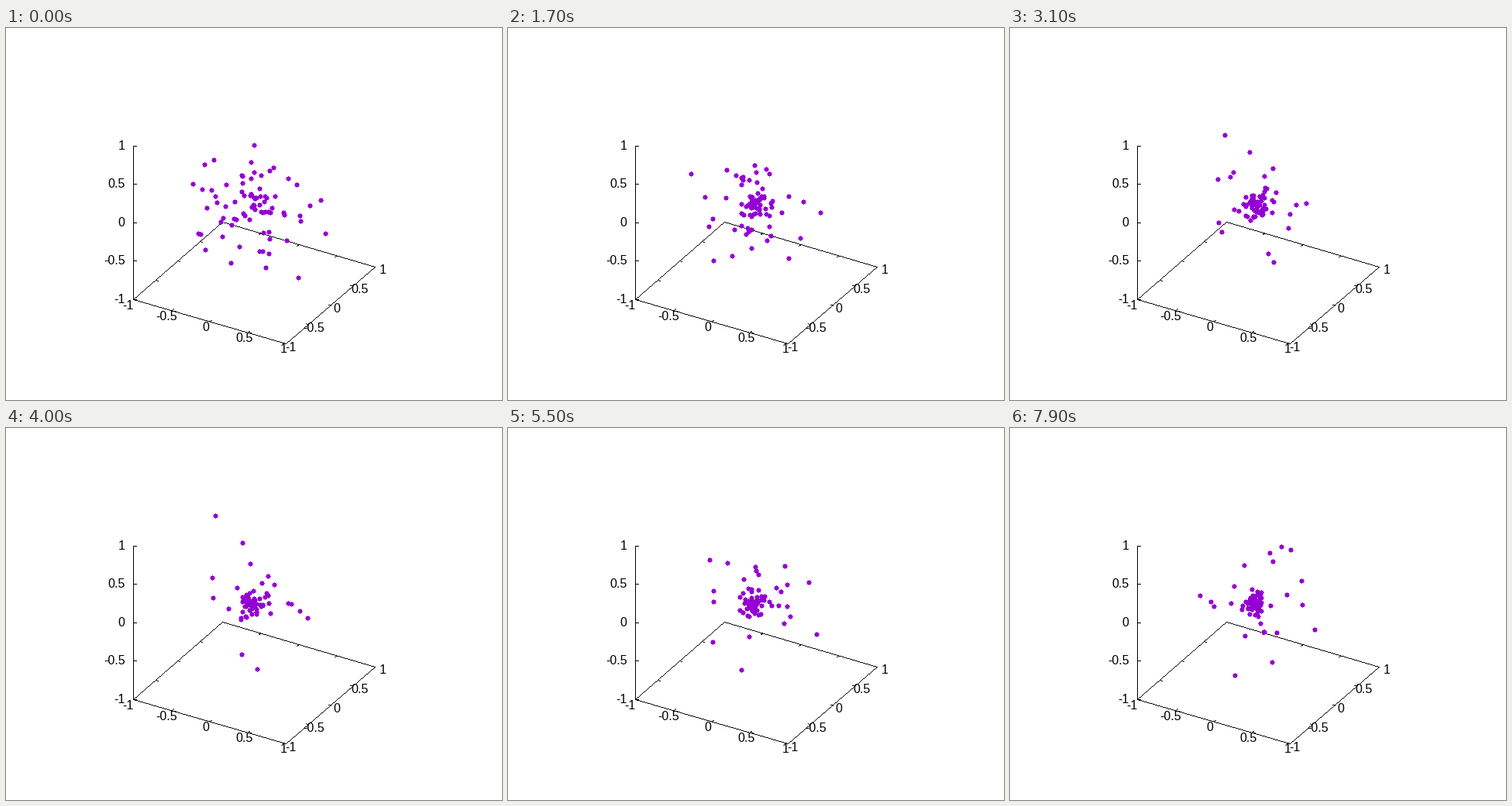
Write a matplotlib script that moves like this. It is 640x480 px and loops after 8 s.

```python
import numpy as np
import matplotlib.pyplot as plt
from matplotlib.animation import FuncAnimation
from matplotlib.collections import PolyCollection

W, H, DPI = 640, 480, 100
FRAMES, STEP = 80, 100

fig = plt.figure(figsize=(W / DPI, H / DPI), dpi=DPI, facecolor="white")
ax = fig.add_axes([0, 0, 1, 1])
ax.set(xlim=(0, W), ylim=(H, 0))
ax.axis("off")


def shapes(verts, color, z):
    c = PolyCollection(verts, facecolor=color, edgecolor="none", lw=0,
                       antialiased=False, snap=False, zorder=z)
    return ax.add_collection(c, autolim=False)


def line(p, q):
    """One-pixel line made of unit squares, without smoothing."""
    p, q = np.array(p, float), np.array(q, float)
    n = int(np.ceil(np.abs(q - p).max()))
    cells = np.floor(np.linspace(p, q, n + 1) + 0.5)
    unit = np.array([(0, 0), (1, 0), (1, 1), (0, 1)])
    shapes(cells[:, None] + unit, "black", 1)


def label(x, y, s, ha="center"):
    ax.text(x, y + 5, s, ha=ha, va="baseline", fontsize=16 * 72 / DPI,
            family="Liberation Sans", color="black")


# Base plane, vertical axis, ticks and labels
left, front, right, back = np.array([(164, 350), (361, 407), (476, 308), (279, 250)])
corners = [left, front, right, back]
for p, q in zip(corners, corners[1:] + corners[:1]):
    line(p, q)
line((164, 152), left)
along_x = 3 * (front - left) / np.hypot(*(front - left))
along_y = 3 * (back - left) / np.hypot(*(back - left))

for i, name in enumerate(["-1", "-0.5", "0", "0.5", "1"]):
    k = i / 4
    z = int(350 - 198 * k)
    line((164, z), (168, z))
    label(153.5, z, name, "right")
    label(157 + 201 * k, 358 + 56 * k, name)
    label(367 + 119 * k, 412 - 100 * k, name)
    if 0 < i < 4:
        for p, q, d in ((left, front, along_y), (back, right, -along_y),
                        (left, back, along_x), (front, right, -along_x)):
            a = p + k * (q - p)
            line(a, a + d)

# Four far bodies follow smooth paths through a few key points
KEYS = np.array([0, 2, 4, 6, 7.9])
FAR = np.array([
    [(268, 170), (283, 180), (270, 113), (258, 190), (259, 224)],
    [(320, 151), (317, 178), (305, 148), (325, 185), (350, 153)],
    [(377, 322), (358, 295), (324, 311), (296, 312), (290, 319)],
    [(412, 265), (400, 235), (368, 227), (352, 262), (338, 302)]], float)
SLOPE = np.gradient(FAR, KEYS, axis=1)

# All others start in a cloud and swing through the core; the inner ones settle
STRAYS, INNER = 18, 56
rng = np.random.default_rng(11)
radius = np.concatenate([rng.uniform(60, 105, STRAYS),
                         72 * rng.random(INNER) ** 0.7])[:, None]
settle = np.repeat([0.85, 0.32], [STRAYS, INNER])[:, None]
omega = 6.3 / (radius + 1) ** 0.58


def directions():
    v = rng.normal(size=(STRAYS + INNER, 3))
    return (v / np.linalg.norm(v, axis=1, keepdims=True))[:, :2]


offset = radius * directions()
drift = 0.75 * radius * directions()


def far_at(t):
    s = min(np.searchsorted(KEYS, t, side="right") - 1, len(KEYS) - 2)
    h = KEYS[s + 1] - KEYS[s]
    u = (t - KEYS[s]) / h
    return ((1 + 2 * u) * (1 - u) ** 2 * FAR[:, s]
            + u * (1 - u) ** 2 * h * SLOPE[:, s]
            + u * u * (3 - 2 * u) * FAR[:, s + 1]
            + u * u * (u - 1) * h * SLOPE[:, s + 1])


def cloud_at(t):
    core = np.array([321 - 0.8 * t, 227])
    size = settle + (1 - settle) * np.exp(-(t / 2.4) ** 2)
    return core + size * (offset * np.cos(omega * t) + drift * np.sin(omega * t))


# Dot: a 5 px square with a 1 px nub on each side
side = np.array([(0.5, -3.5), (0.5, -2.5), (2.5, -2.5), (2.5, -0.5)])
turn = np.array([(0, 1), (-1, 0)])
dot = np.concatenate([side @ np.linalg.matrix_power(turn, n) for n in range(4)])
dots = shapes([], "#9400d3", 5)


def draw(i):
    t = i * STEP / 1000
    pos = np.round(np.concatenate([far_at(t), cloud_at(t)])) + 0.5
    dots.set_verts(pos[:, None] + dot)
    return [dots]


anim = FuncAnimation(fig, draw, frames=FRAMES, interval=STEP, repeat=True,
                     repeat_delay=0, blit=False)
plt.show()
```
